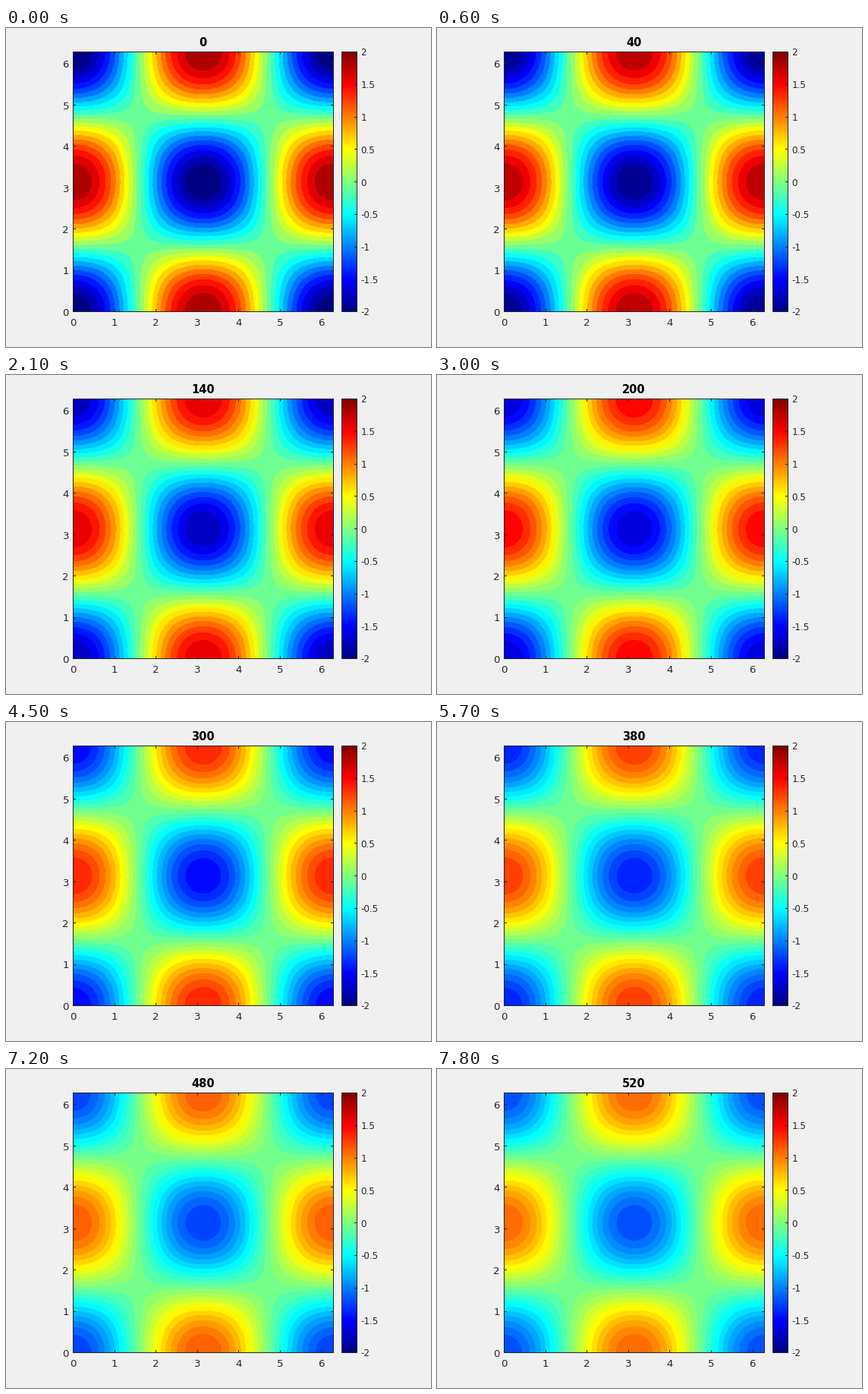
A matplotlib script that plays this animation: 560x420 px, repeating every 8000 ms.

```python
import numpy as np
import matplotlib.pyplot as plt
from matplotlib.animation import FuncAnimation

W, H, DPI = 560, 420, 80
PX = 72 / DPI                       # points per pixel
LEFT, RIGHT, TOP, BOTTOM = 88.5, 431.5, 31.5, 373.5
BAR_L, BAR_R = 442.5, 462.5
INK = (0.15, 0.15, 0.15)
TICK = 3.5
BANDS = 21

plt.rcParams["font.family"] = "DejaVu Sans"


def jet_table():
    i = np.arange(1, 257)

    def ramp(shift):
        return np.clip(np.minimum(i - 32 - shift, 224 + shift - i) / 64, 0, 1)

    return np.column_stack([ramp(64), ramp(0), ramp(-64)])


JET = jet_table()


def jet(value):
    index = np.floor((np.asarray(value) + 2) / 4 * 256).astype(int)
    return JET[np.clip(index, 0, 255)]


fig = plt.figure(figsize=(W / DPI, H / DPI), dpi=DPI, facecolor=(0.94,) * 3)
ax = fig.add_axes([0, 0, 1, 1])
ax.axis("off")


def line(xs, ys):
    ax.plot(xs, ys, color=INK, lw=PX, solid_capstyle="butt",
            solid_joinstyle="miter", snap=False, zorder=5)


def box(x0, x1):
    line([x0, x1, x1, x0, x0, x1], [TOP, TOP, BOTTOM, BOTTOM, TOP, TOP])


def pixel_center(v):
    return np.floor(v) + 0.5


def label(x, y, text, size, ha, color=INK, **style):
    return ax.text(x, y, text, fontsize=size * PX, ha=ha, va="baseline",
                   color=color, **style)


# The field only decays in amplitude, so the band shapes stay fixed.
u = np.linspace(0, 2 * np.pi, 241)
gx, gy = np.meshgrid(u, u)
field = -np.cos(gx) * np.cos(gy)
edges = np.linspace(-1, 1, BANDS + 1)
fill_edges = edges.copy()
fill_edges[[0, -1]] = -1.01, 1.01
bands = ax.contourf(LEFT + gx / (2 * np.pi) * (RIGHT - LEFT),
                    BOTTOM - gy / (2 * np.pi) * (BOTTOM - TOP),
                    field, levels=fill_edges)
bands.set_array(None)               # band colours are set directly
bands.set_edgecolor("none")

ax.imshow(JET[::-1, None, :], extent=(BAR_L, BAR_R, BOTTOM, TOP),
          aspect="auto", interpolation="nearest")
ax.set_xlim(0, W)
ax.set_ylim(H, 0)

box(LEFT, RIGHT)
box(BAR_L, BAR_R)

for n in range(7):
    x = LEFT + n / (2 * np.pi) * (RIGHT - LEFT)
    y = BOTTOM - n / (2 * np.pi) * (BOTTOM - TOP)
    px, py = pixel_center(x), pixel_center(y)
    line([px, px], [BOTTOM, BOTTOM - TICK])
    line([px, px], [TOP, TOP + TICK])
    line([LEFT, LEFT + TICK], [py, py])
    line([RIGHT, RIGHT - TICK], [py, py])
    label(x - 0.5, 392, str(n), 13.33, "center")
    label(83, y + 5.3, str(n), 13.33, "right")

for value in np.arange(-2, 2.1, 0.5):
    y = BOTTOM - (value + 2) / 4 * (BOTTOM - TOP)
    py = pixel_center(y)
    line([BAR_R, BAR_R - TICK], [py, py])
    label(467.5, y + 5, f"{value:g}", 12, "left")

title = label(259.5, 24, "0", 14.67, "center", color="black", weight="bold")


def update(frame):
    step = 20 * (frame // 3)
    amplitude = 2 * np.exp(-0.001 * step)
    bands.set_facecolor(jet(amplitude * edges[:-1]))
    title.set_text(str(step))
    return bands, title


anim = FuncAnimation(fig, update, frames=80, interval=100,
                     repeat=True, repeat_delay=0, blit=False)
plt.show()
```
